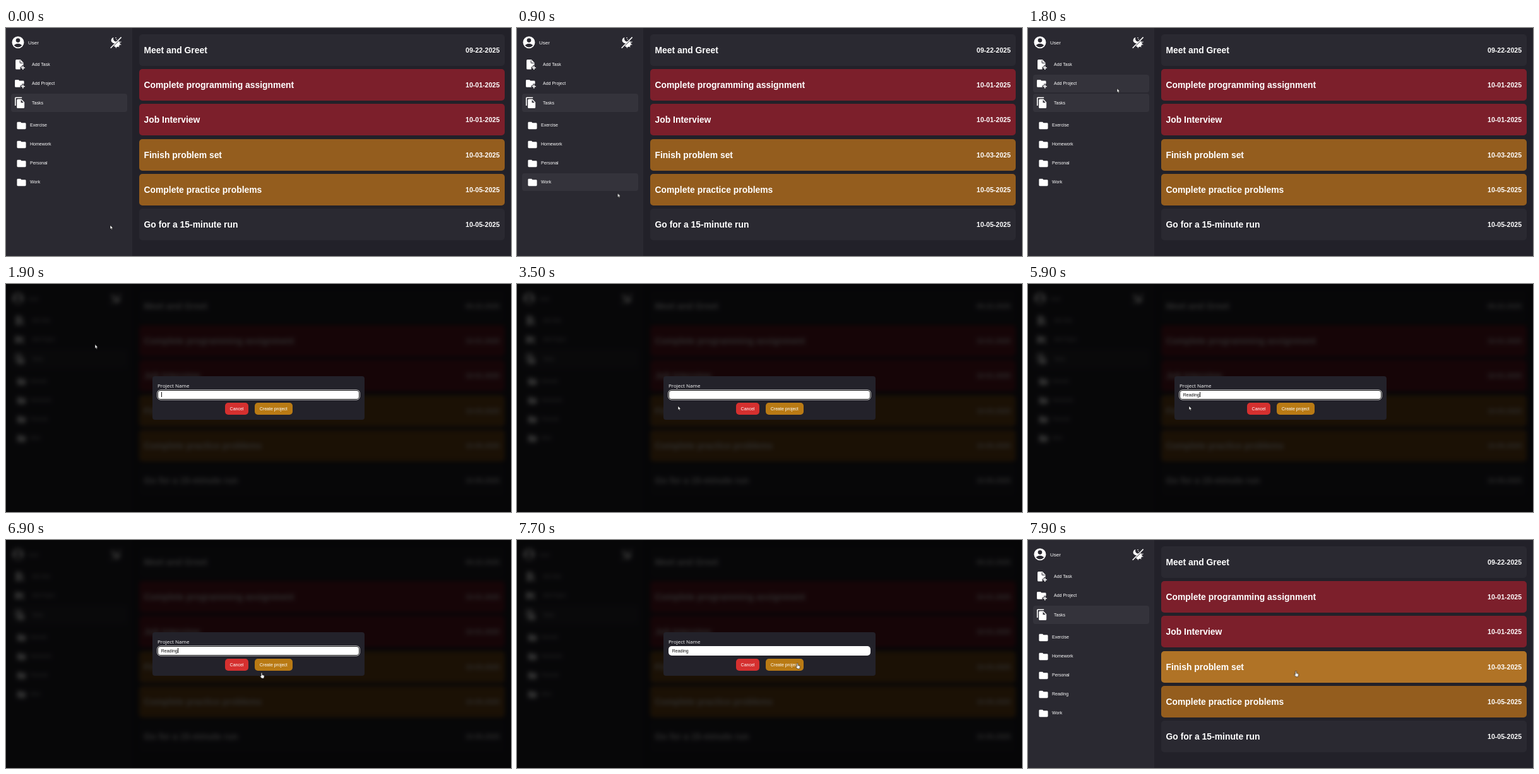
An HTML page for the animation above (8 s loop, 800 by 361 pixels).

```html
<!DOCTYPE html>
<html lang="en">
<head>
<meta charset="utf-8">
<title>Task list</title>
<style>
  :root {
    --panel: #2a2931;
    --page: #222129;
    --lit: #34333b;
    --loop: 8s step-end infinite;
  }
  * { box-sizing: border-box; }
  html, body { margin: 0; width: 100%; height: 100%; overflow: hidden; background: var(--page); }
  body { position: relative; font: 7px "Liberation Sans", Arial, sans-serif; color: #fff; white-space: nowrap; }
  svg { position: absolute; overflow: visible; }

  .side { position: absolute; inset: 0 auto 0 0; width: 200px; background: var(--panel); }
  .user { position: absolute; left: 35px; top: 18px; font-size: 8px; line-height: 11px; }
  .row {
    position: relative; width: 184px; height: 28px; padding-left: 30px;
    display: flex; align-items: center; border-radius: 4px;
  }
  .menu { position: absolute; left: 8px; height: 28.5px; padding-left: 33px; }
  .current { background: var(--lit); }
  .projects { position: absolute; left: 8px; top: 139.5px; }
  .projects .row { margin-bottom: 2px; }
  .projects svg { left: 7.5px; top: 6px; width: 17px; height: 17px; }
  .pass { animation: pass var(--loop) var(--at); }
  .pressed { animation: pressed var(--loop); }
  .added { height: 0; overflow: hidden; animation: added var(--loop); }

  .cards { position: absolute; left: 210.5px; top: 10px; width: 579.5px; }
  .card {
    display: flex; align-items: center; justify-content: space-between;
    height: 50px; margin-bottom: 5.2px; padding: 0 8px; border-radius: 5px;
    background: var(--panel); font-weight: bold; font-size: 13.9px;
  }
  .card time { font-size: 10.55px; }
  .late { background: #7c1f2b; }
  .soon { background: #945d1e; }
  .hovered { animation: hovered var(--loop); }

  .overlay {
    position: absolute; inset: 0; visibility: hidden;
    background: rgba(0, 0, 0, .82); backdrop-filter: blur(3.5px);
    animation: overlay var(--loop);
  }
  .dialog {
    position: absolute; left: 232px; top: 146px; width: 336px; height: 69px;
    border-radius: 4px; background: #23222a;
  }
  .dialog > * { position: absolute; }
  label { left: 8px; top: 9px; font: 8px/11px "Open Sans", "Noto Sans", sans-serif; }
  .field {
    left: 8px; top: 22px; width: 320px; height: 14.5px; padding-left: 5.7px;
    display: flex; align-items: center; border-radius: 5px;
    background: #fff; color: #111; animation: focus var(--loop);
  }
  .field::before { content: ""; animation: typing var(--loop); }
  .field::after { content: ""; width: .8px; height: 8px; background: #111; opacity: 0; animation: caret var(--loop); }
  .button {
    top: 42px; height: 18.5px; display: flex; align-items: center; justify-content: center; border-radius: 5px;
  }
  .cancel { left: 115px; width: 37px; background: #d5302f; }
  .create { left: 162px; width: 59.5px; background: #b97a14; }

  .pointer { left: 0; top: 0; width: 1px; height: 1px; animation: travel 8s linear infinite; }
  .pointer path { fill: #fff; stroke: #000; stroke-width: .6; }
  .arrow { animation: arrow var(--loop); }
  .hand { visibility: hidden; animation: hand var(--loop); }

  @keyframes travel {
    0%, 7.5% { transform: translate(165px, 312px); animation-timing-function: ease-in-out; }
    18.75%, 24.5% { transform: translate(141px, 95.5px); animation-timing-function: ease-in-out; }
    34%, 80% { transform: translate(255px, 193px); animation-timing-function: ease-in; }
    84.4% { transform: translate(345px, 233px); animation-timing-function: ease-out; }
    88.75%, 96.25% { transform: translate(444.5px, 195px); }
    97.5% { transform: translate(438px, 200px); }
    98.75%, 100% { transform: translate(424.5px, 207.5px); }
  }
  @keyframes arrow { 0% { visibility: visible; } 86.25%, 100% { visibility: hidden; } }
  @keyframes hand { 0% { visibility: hidden; } 86.25%, 100% { visibility: visible; } }
  @keyframes pass { 0% { background: var(--lit); } 1.1%, 100% { background: none; } }
  @keyframes pressed { 0% { background: none; } 17.6% { background: var(--lit); } 23.75%, 100% { background: none; } }
  @keyframes overlay { 0% { visibility: hidden; } 23.75% { visibility: visible; } 97.5%, 100% { visibility: hidden; } }
  @keyframes focus {
    0% { box-shadow: inset 0 0 0 1px #111, 0 0 0 .8px #e8e8e8; }
    95%, 100% { box-shadow: none; }
  }
  @keyframes typing {
    0% { content: ""; }
    58.75% { content: "R"; }
    61.25% { content: "Re"; }
    63.75% { content: "Rea"; }
    66.25% { content: "Read"; }
    68.75% { content: "Readi"; }
    70% { content: "Readin"; }
    72.5%, 100% { content: "Reading"; }
  }
  @keyframes caret {
    0%, 30%, 42.5%, 55%, 78.75%, 91.25%, 100% { opacity: 0; }
    23.75%, 36.25%, 48.75%, 58.75%, 85% { opacity: 1; }
  }
  @keyframes added { 0% { height: 0; } 97.5%, 100% { height: 30px; } }
  @keyframes hovered { 0% { background: #945d1e; } 97.5%, 100% { background: #b07326; } }
</style>
</head>
<body>
<svg width="0" height="0">
  <symbol id="folder" viewBox="0 0 24 24">
    <path fill="#fff" d="M10 4H4c-1.1 0-2 .9-2 2v12c0 1.1.9 2 2 2h16c1.1 0 2-.9 2-2V8c0-1.1-.9-2-2-2h-8z"/>
  </symbol>
</svg>

<div class="side">
  <div class="user">User</div>
  <div class="row menu" style="top:43px">Add Task</div>
  <div class="row menu pressed" style="top:73.5px">Add Project</div>
  <div class="row menu current" style="top:104px">Tasks</div>

  <svg width="200" height="140" fill="#fff">
    <!-- account -->
    <circle cx="19" cy="22.7" r="9.5"/>
    <g fill="#2a2931">
      <circle cx="19" cy="19.6" r="3.3"/>
      <path d="M12.6 27.6q2.3-2.9 6.4-2.9t6.4 2.9q-2.5 2.8-6.4 2.8t-6.4-2.8z"/>
    </g>
    <!-- theme switch -->
    <path d="M170.4 15a4.6 4.6 0 1 0 5 6.4 4.4 4.4 0 0 1-5-6.4z"/>
    <circle cx="174" cy="15.6" r=".8"/>
    <circle cx="175.2" cy="18.2" r=".7"/>
    <path d="M170.8 28.6l8.2-8.2a5.8 5.8 0 0 1-8.2 8.2z"/>
    <path d="M180.8 21.5l2.2.3-2 1.6zM180.8 25l2 1.4-2.6.5zM178.6 28.3l1.2 2.3-2.5-1zM174.9 29.8l.1 2.5-1.8-1.9z"/>
    <path d="M165.7 31.8L182.6 14.6" fill="none" stroke="#fff" stroke-width="1.5"/>
    <!-- new task -->
    <path d="M16.6 50h6.2l4.7 4.7v4.2h-2.3v2.7h-2.7v3.9h-5.9q-1.5 0-1.5-1.5V51.5q0-1.5 1.5-1.5z"/>
    <path d="M22.2 51.2v4.2h4.2" fill="none" stroke="#2a2931"/>
    <path d="M26.8 59.9v6.2M23.7 63h6.2" stroke="#fff" stroke-width="1.6"/>
    <!-- new project -->
    <path d="M15.5 82h4.3l1.6 1.6h5.8q1.4 0 1.4 1.4v3.6h-3.5v2.3h-2.6v2.9h-7q-1.4 0-1.4-1.4v-9q0-1.4 1.4-1.4z"/>
    <path d="M26.8 89.4v6.2M23.7 92.5h6.2" stroke="#fff" stroke-width="1.6"/>
    <!-- all tasks -->
    <path transform="translate(12.4 108.6) scale(.8)" fill-rule="evenodd"
      d="M16 1H4c-1.1 0-2 .9-2 2v15h2V3h12zm-1 4l6 6v10c0 1.1-.9 2-2 2H8c-1.1 0-2-.9-2-2V7c0-1.1.9-2 2-2zm-1 7h5.5L14 6.5z"/>
  </svg>

  <div class="projects">
    <div class="row pass" style="--at:1.15s"><svg><use href="#folder"/></svg>Exercise</div>
    <div class="row pass" style="--at:1.06s"><svg><use href="#folder"/></svg>Homework</div>
    <div class="row pass" style="--at:.98s"><svg><use href="#folder"/></svg>Personal</div>
    <div class="added"><div class="row"><svg><use href="#folder"/></svg>Reading</div></div>
    <div class="row pass" style="--at:.89s"><svg><use href="#folder"/></svg>Work</div>
  </div>
</div>

<div class="cards">
  <div class="card">Meet and Greet<time>09-22-2025</time></div>
  <div class="card late">Complete programming assignment<time>10-01-2025</time></div>
  <div class="card late">Job Interview<time>10-01-2025</time></div>
  <div class="card soon hovered">Finish problem set<time>10-03-2025</time></div>
  <div class="card soon">Complete practice problems<time>10-05-2025</time></div>
  <div class="card">Go for a 15-minute run<time>10-05-2025</time></div>
</div>

<div class="overlay">
  <div class="dialog">
    <label>Project Name</label>
    <div class="field"></div>
    <div class="button cancel">Cancel</div>
    <div class="button create">Create project</div>
  </div>
</div>

<svg class="pointer">
  <path class="arrow" d="M0 0V6.6L1.5 5.3 2.5 7.6 3.7 7.1 2.7 4.9H4.6Z"/>
  <path class="hand" d="M-1 .8a.9.9 0 0 1 1.8 0V3.6l2.2.5q1.2.3 1.1 1.5l-.5 2.2q-.2 1.2-.9 1.2H0L-2.6 6q-.5-.9.3-1.1L-1 5.6Z"/>
</svg>
</body>
</html>
```
